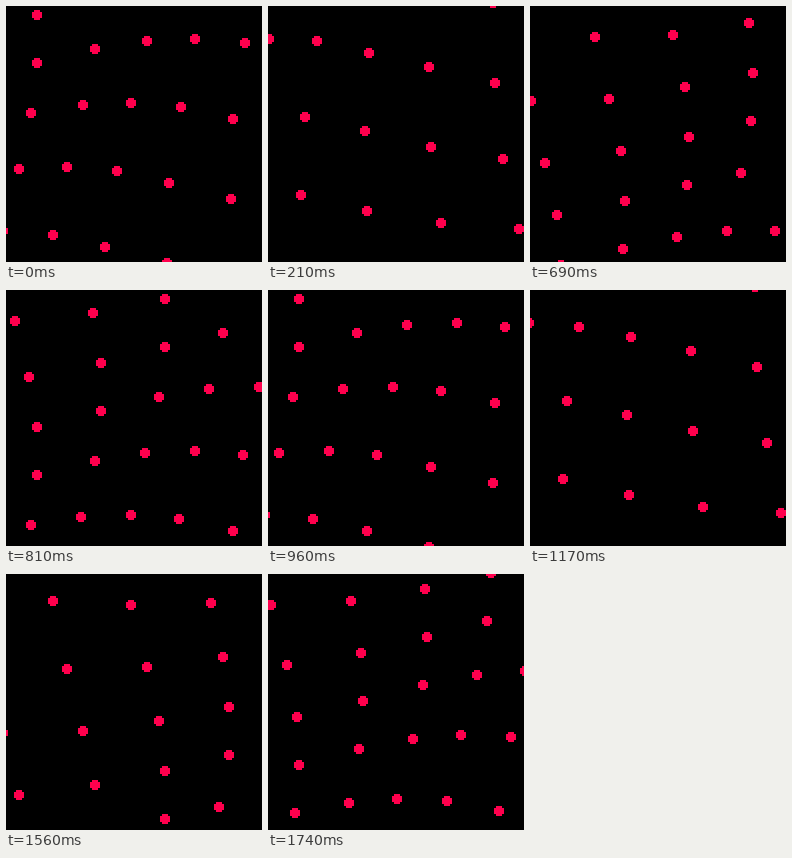
Recreate the animation shown at these times as an HTML page with a canvas. Size 256x256 px, loop 1770 ms.

```html
<!DOCTYPE html>
<html lang="en">
<head>
<meta charset="utf-8">
<title>Dot wave</title>
<style>
  html, body { margin: 0; width: 100%; height: 100%; overflow: hidden; background: #000; }
  canvas { display: block; width: 100vw; height: 100vh; image-rendering: pixelated; }
</style>
</head>
<body>
<canvas id="stage" width="128" height="128"></canvas>
<script>
  const ctx = document.getElementById('stage').getContext('2d');
  const STEP_MS = 30, STEPS = 59;
  const CELL = 32, RADIUS = 16;
  // Angles in degrees: start, turn per step, lag per column and per row
  const START = 17.34, TURN = 11.284, LAG_X = 28.27, LAG_Y = 28.29;

  // Five-pixel disc without its corners
  function dot(x, y) {
    ctx.fillRect(x - 1, y - 2, 3, 5);
    ctx.fillRect(x - 2, y - 1, 5, 3);
  }

  function draw(step) {
    ctx.fillStyle = '#000';
    ctx.fillRect(0, 0, 128, 128);
    ctx.fillStyle = '#ff004d';
    for (let row = 0; row < 5; row++) {
      for (let col = 0; col < 5; col++) {
        const angle = (START - TURN * step - LAG_X * col - LAG_Y * row) * Math.PI / 180;
        dot(Math.floor(col * CELL + RADIUS * Math.cos(angle)),
            Math.floor(row * CELL + RADIUS * Math.sin(angle)));
      }
    }
  }

  const begin = performance.now();
  function tick() {
    draw(Math.floor((performance.now() - begin) / STEP_MS) % STEPS);
    requestAnimationFrame(tick);
  }
  tick();
</script>
</body>
</html>
```
